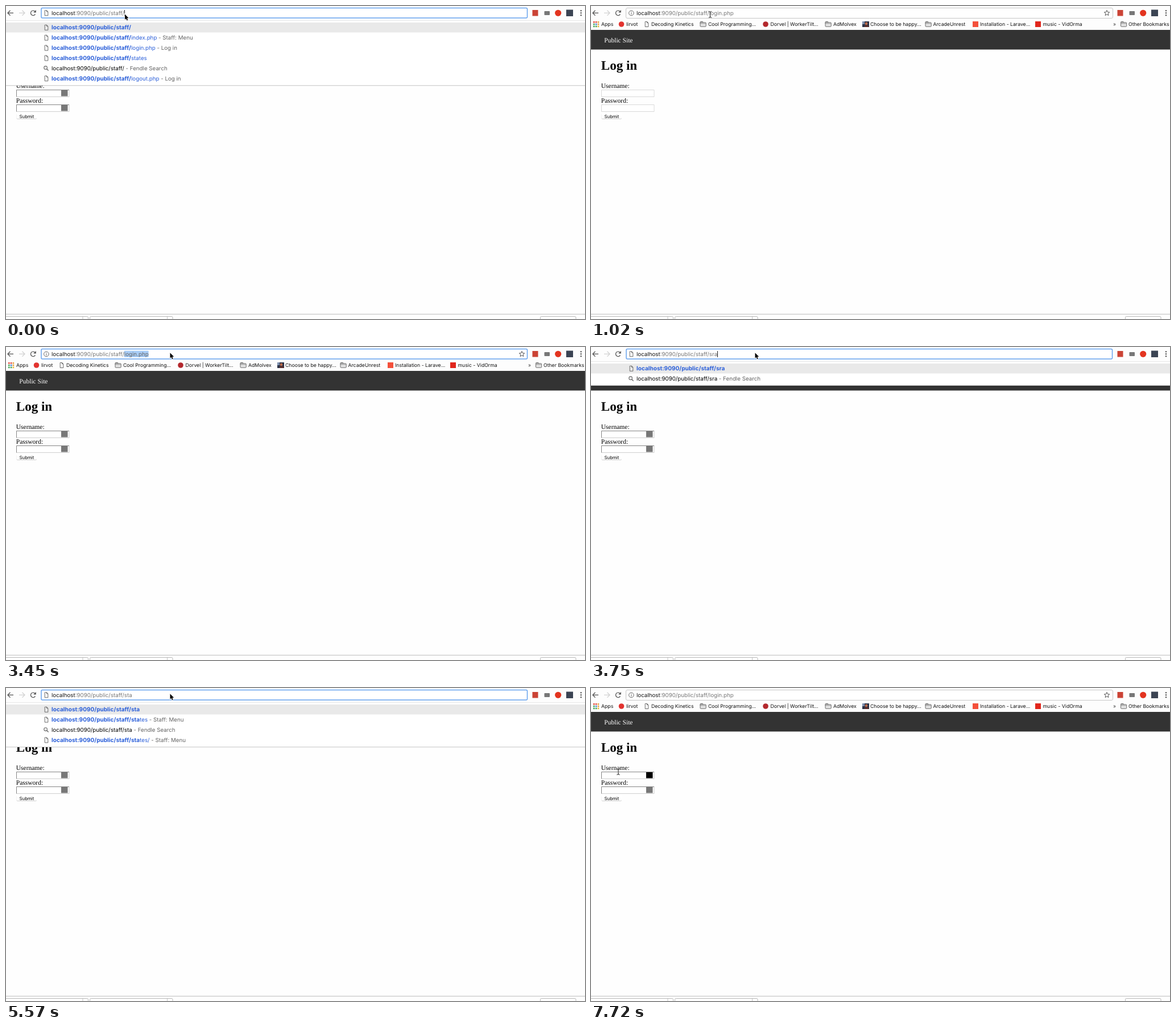
Animation, 1018 px wide and 550 px high, one loop 8 s. Source, as an HTML page with a canvas:

```html
<!DOCTYPE html>
<html lang="en">
<head>
<meta charset="utf-8">
<title>Login page</title>
<style>
html, body { margin: 0; width: 100%; height: 100%; overflow: hidden; background: #fefefe; }
canvas { display: block; }
</style>
</head>
<body>
<canvas id="stage" width="1018" height="550"></canvas>
<script>
const ctx = document.getElementById('stage').getContext('2d');
ctx.textRendering = 'geometricPrecision';
const LOOP = 8000;
const UI = 'Inter, Roboto, sans-serif';
const SERIF = '"Liberation Serif", "Times New Roman", serif';
const URL_FONT = `9.75px ${UI}`, BOLD_FONT = `bold 10.07px ${UI}`, MARK_FONT = `8.7px ${UI}`;
const BASE = 'localhost:9090/public/staff/';
const BLUE = '#2b5fd9', GREY = '#646464', INK = '#111';

// Each step changes only the listed parts of the state.
const STEPS = [
  [0, { path: '', typing: true, focus: true, caret: true, loading: false, icons: true,
        hover: false, sel: 0, ibeam: false, x: 209, y: 14.5 }],
  [150, { typing: false, focus: false, caret: false, loading: true }],
  [690, { path: 'login.php', ibeam: true, x: 209.5, y: 15 }],
  [850, { icons: false, loading: false }],
  [1200, { icons: true }],
  [1680, { y: 14 }],
  [1830, { x: 222, y: 13 }],
  [1980, { x: 237, y: 12 }],
  [2120, { x: 224 }],
  [2270, { x: 209.5 }],
  [2570, { focus: true }],
  [2720, { x: 238, sel: 6 }],
  [2860, { x: 288.5, sel: 9 }],
  [3450, { ibeam: false, x: 288.5, y: 10.3 }],
  [3600, { path: 's', typing: true, caret: true, sel: 0 }],
  [3750, { path: 'sra' }],
  [3930, { path: 'srat' }],
  [4380, { path: 'sr' }],
  [4530, { path: 's' }],
  [4830, { path: 'st' }],
  [4970, { path: 'sta' }],
  [5570, { caret: false }],
  [5710, { path: 'states', typing: false, focus: false, loading: true }],
  [5860, { ibeam: true, y: 12 }],
  [6040, { path: 'login.php' }],
  [6370, { icons: false, loading: false }],
  [6520, { icons: true }],
  [6820, { ibeam: false, x: 274, y: 32 }],
  [6970, { x: 232, y: 68 }],
  [7120, { x: 199, y: 84 }],
  [7420, { x: 145, y: 112 }],
  [7570, { x: 85, y: 134 }],
  [7720, { ibeam: true, x: 48, y: 147, hover: true }]
];

const BOOKMARKS = [
  ['apps', 9, 18, 'Apps'],
  ['dot', 53.5, 62, 'lirvot', '#e2332f'],
  ['page', 98, 106, 'Decoding Kinetics'],
  ['folder', 197, 206, 'Cool Programming...'],
  ['dot', 307, 315.5, 'Dorvel | WorkerTilt...', '#b3282d'],
  ['folder', 417, 426, 'AdMolvex'],
  ['photo', 483, 491, 'Choose to be happy...'],
  ['folder', 593, 601.5, 'ArcadeUnrest'],
  ['square', 676, 684, 'Installation - Larave...', '#f4503b'],
  ['square', 786, 794.5, 'music - VidOrma', '#e1261c'],
  ['folder', 936.5, 945, 'Other Bookmarks']
];

function rect(x, y, w, h, color) {
  ctx.fillStyle = color;
  ctx.fillRect(x, y, w, h);
}

function box(x, y, w, h, r, fill, stroke, width = 1) {
  ctx.beginPath();
  ctx.roundRect(x, y, w, h, r);
  if (fill) { ctx.fillStyle = fill; ctx.fill(); }
  if (stroke) { ctx.strokeStyle = stroke; ctx.lineWidth = width; ctx.stroke(); }
}

function disc(x, y, r, color) {
  ctx.beginPath();
  ctx.arc(x, y, r, 0, 7);
  ctx.fillStyle = color;
  ctx.fill();
}

function line(color, width, ...points) {
  ctx.beginPath();
  points.forEach(([x, y]) => ctx.lineTo(x, y));
  ctx.strokeStyle = color;
  ctx.lineWidth = width;
  ctx.stroke();
}

// Draws text and returns the x where it ends.
function text(str, x, y, font, color) {
  ctx.font = font;
  ctx.fillStyle = color;
  ctx.fillText(str, x, y);
  return x + ctx.measureText(str).width;
}

function pageIcon(x, y) {
  line('#6a6a6a', 1, [x + .7, y - 4.5], [x - 2.8, y - 4.5], [x - 2.8, y + 4.5], [x + 2.8, y + 4.5],
    [x + 2.8, y - 2.3], [x + .5, y - 2.3], [x + .5, y - 4.5], [x + 2.8, y - 2.3]);
}

function folder(x, y) {
  box(x - 5, y - 4.5, 5, 4, 1, '#d5d5d5', '#6f6f6f');
  box(x - 5, y - 3, 10.2, 7.2, 1, '#e3e3e3', '#6f6f6f');
  line('#8a8a8a', .8, [x - 5, y - 1.2], [x + 5, y - 1.2]);
}

function apps(x, y) {
  const colors = ['#e4483b', '#e4483b', '#e9a23b', '#43a556', '#4385e0', '#e9a23b', '#43a556', '#43a556', '#e9b93b'];
  colors.forEach((c, i) => rect(x - 5 + i % 3 * 3.8, y - 5 + Math.floor(i / 3) * 3.8, 2.6, 2.6, c));
}

function photo(x, y) {
  rect(x - 6, y - 5, 12, 10, '#2c3347');
  rect(x - 6, y - 5, 4, 5, '#7d8fae');
  disc(x + 1, y - 1, 2.4, '#b96a4a');
  rect(x - 2, y + 2, 7, 3, '#5b2d2a');
}

function bookmarks() {
  const y = 32;
  const draw = {
    apps, folder, photo, page: pageIcon,
    dot: (x, y, c) => disc(x, y, 4.8, c),
    square: (x, y, c) => rect(x - 5, y - 5, 10, 10, c)
  };
  rect(0, 24, 1018, 18, '#fdfdfd');
  for (const [icon, ix, tx, label, color] of BOOKMARKS) {
    draw[icon](ix, y, color);
    text(label, tx, 35, MARK_FONT, INK);
  }
  text('»', 918, 34.5, MARK_FONT, '#444');
}

function field(y, s, dark) {
  box(18.5, y + .5, 92.5, 12, 0, '#fff', s.icons ? '#cfcfcf' : '#d9d9d9');
  if (!s.icons) return;
  line('#858585', 1, [18.5, y + 12.5], [18.5, y + .5], [111, y + .5]);
  rect(97, y + 1, 11.5, 10.5, dark ? '#000' : '#777');
}

function page(s) {
  rect(0, 0, 1018, 550, '#fefefe');
  rect(0, 42, 1018, 34.5, '#333');
  text('Public Site', 23.3, 63.5, `11.5px ${SERIF}`, '#fff');
  text('Log in', 17.8, 112, `bold 23px ${SERIF}`, '#000');
  text('Username:', 17.8, 143.7, `11.5px ${SERIF}`, '#000');
  field(147, s, s.hover);
  text('Password:', 17.8, 170.2, `11.5px ${SERIF}`, '#000');
  field(173, s, false);
  box(18.5, 189, 35.5, 10, 2, '#d2d2d2');
  box(18.5, 188, 35.5, 10, 2, '#fff');
  text('Submit', 23.4, 196.7, `7.9px ${UI}`, '#000');

  // Download bar
  rect(0, 541, 1018, 1, '#bdbdbd');
  for (const [x, w, split] of [[-6, 150.5, 135], [147.5, 145.5, 283.5], [939.5, 62.5, 0]]) {
    box(x, 545.5, w, 12, 2, '#fff', '#b9b9b9');
    if (split) line('#c6c6c6', 1, [split, 546], [split, 550]);
  }
}

function suggestions(path) {
  const exact = ['', ''], search = ['search'];
  const menu = 'Staff: Menu';
  if (!path) return [exact, ['index.php', menu], ['login.php', 'Log in'], ['states', ''], search, ['logout.php', 'Log in']];
  if (!'states'.startsWith(path)) return [exact, search];
  const rest = 'states'.slice(path.length);
  return [exact, [rest, menu], search, [rest + '/', menu]];
}

function dropdown(path) {
  const rows = suggestions(path), pitch = 17.9;
  const bottom = Math.round(31.4 + pitch * rows.length);
  rect(0, 24, 1018, bottom - 24, '#fff');
  rect(0, 25, 1018, 1, '#e6e6e6');
  rect(0, bottom, 1018, 1, '#d3d3d3');
  rect(0, bottom + 1, 1018, 1, 'rgba(0,0,0,.06)');
  rect(0, 29, 1018, 17.5, '#e9e9e9');
  rows.forEach(([rest, title], i) => {
    const y = 37.8 + i * pitch, base = y + 3.6;
    let x;
    if (rest === 'search') {
      ctx.beginPath();
      ctx.arc(69.6, y - 1, 2.8, 0, 7);
      ctx.strokeStyle = '#666';
      ctx.lineWidth = 1.1;
      ctx.stroke();
      line('#666', 1.4, [71.6, y + 1], [74.6, y + 4]);
      x = text(BASE + path, 80, base, URL_FONT, '#000');
      title = 'Fendle Search';
    } else {
      pageIcon(71, y);
      x = text(BASE + path, 80, base, BOLD_FONT, BLUE);
      x = text(rest, x, base, URL_FONT, BLUE);
    }
    if (title) text(' - ' + title, x, base, URL_FONT, GREY);
  });
}

function arrowIcon(x, dir, color) {
  line(color, 1.3, [x - 5 * dir, 12.3], [x + 4.5 * dir, 12.3]);
  line(color, 1.3, [x + .5 * dir, 7.8], [x + 5 * dir, 12.3], [x + .5 * dir, 16.8]);
}

function reloadIcon() {
  ctx.beginPath();
  ctx.arc(47.7, 12.3, 4.2, .5, 5.5);
  ctx.strokeStyle = '#555';
  ctx.lineWidth = 1.3;
  ctx.stroke();
  ctx.beginPath();
  [[52.8, 7], [52.8, 11.6], [48.2, 11.6]].forEach(([x, y]) => ctx.lineTo(x, y));
  ctx.fillStyle = '#555';
  ctx.fill();
}

function star(cx, cy) {
  const points = Array.from({ length: 11 }, (_, i) => {
    const a = i * Math.PI / 5 - Math.PI / 2, r = i % 2 ? 2.2 : 5;
    return [cx + r * Math.cos(a), cy + r * Math.sin(a)];
  });
  line('#555', 1, ...points);
}

function toolbar(s) {
  rect(0, 0, 1018, 25, '#fdfdfd');
  arrowIcon(8, -1, '#555');
  arrowIcon(28, 1, '#d2d2d2');
  if (s.loading) {
    line('#555', 1.4, [43.6, 8.2], [52, 16.6]);
    line('#555', 1.4, [52, 8.2], [43.6, 16.6]);
  } else reloadIcon();

  if (s.focus) box(62, 3.5, 854.5, 17.5, 2, '#fff', '#66a2ee', 1.5);
  else box(61.5, 3.5, 856, 18, 2.5, '#fff', '#c6c6c6');

  if (s.typing) pageIcon(71, 12.3);
  else {
    box(66.6, 8.1, 8.6, 8.6, 4.3, null, '#666');
    rect(70.4, 11.6, 1, 3.2, '#666');
    rect(70.4, 9.8, 1, 1.1, '#666');
    star(907, 12.5);
  }

  let x = text('localhost', 80, 16, URL_FONT, INK);
  x = text(BASE.slice(9), x, 16, URL_FONT, '#777');
  if (s.sel) rect(x, 6.5, ctx.measureText(s.path.slice(0, s.sel)).width, 11.5, '#a9cdf6');
  x = text(s.path, x, 16, URL_FONT, s.sel ? '#666' : '#777');
  if (s.caret) rect(Math.round(x), 7, 1, 11, '#222');

  rect(925.5, 7, 10, 10.5, '#cb4335');
  box(946.5, 9, 9.5, 7, 1, '#777');
  disc(970.7, 12.3, 5.6, '#e3341f');
  rect(985, 6.5, 12, 11.5, '#3b4453');
  [8.3, 12.3, 16.3].forEach(y => disc(1011, y, 1.2, '#555'));
}

function ibeam(x, y) {
  const stroke = (color, w) => {
    line(color, w, [x, y - 4.5], [x, y + 4.5]);
    for (const d of [-1, 1]) line(color, w, [x - 2.5, y + 5.5 * d], [x, y + 4.5 * d], [x + 2.5, y + 5.5 * d]);
  };
  stroke('rgba(255,255,255,.7)', 2.2);
  stroke('#111', 1);
}

function pointer(x, y) {
  ctx.beginPath();
  [[0, 0], [0, 9.4], [2.1, 7.5], [3.6, 10.9], [5.2, 10.2], [3.8, 7], [6.6, 6.8]]
    .forEach(([dx, dy]) => ctx.lineTo(x + dx, y + dy));
  ctx.closePath();
  ctx.strokeStyle = '#fff';
  ctx.lineWidth = 1.4;
  ctx.stroke();
  ctx.fillStyle = '#000';
  ctx.fill();
}

function stateAt(t) {
  return Object.assign({}, ...STEPS.filter(([at]) => at <= t).map(([, change]) => change));
}

function frame(now) {
  const s = stateAt(now % LOOP);
  page(s);
  if (s.typing) dropdown(s.path);
  else bookmarks();
  toolbar(s);
  (s.ibeam ? ibeam : pointer)(s.x, s.y);
  requestAnimationFrame(frame);
}
requestAnimationFrame(frame);
</script>
</body>
</html>
```
